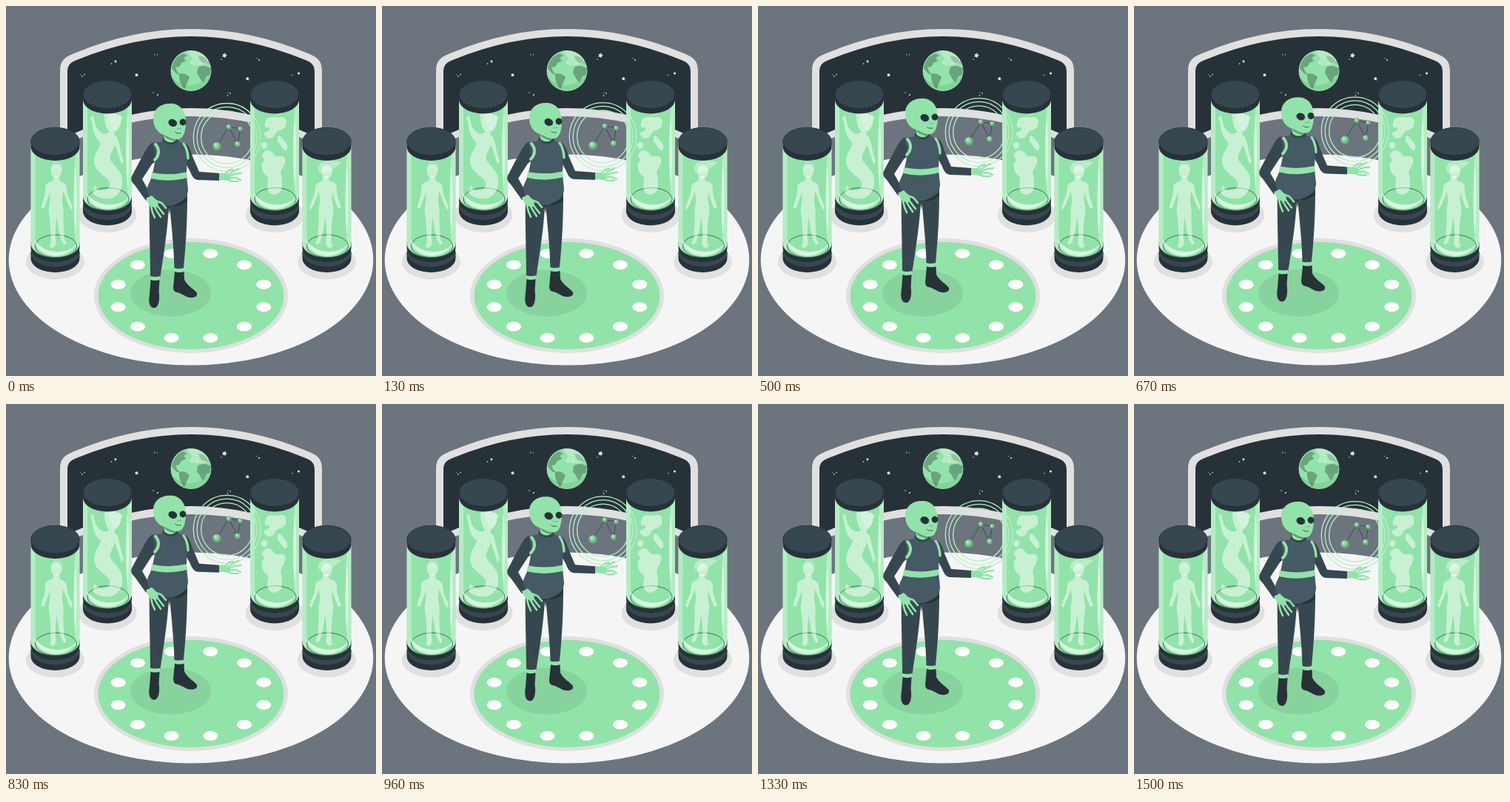
Animation of 500x500 px, one loop 1.54 s. Source, as an HTML page with a canvas:

```html
<!DOCTYPE html>
<html lang="en">
<head>
<meta charset="utf-8">
<title>Alien laboratory</title>
<style>
  html, body { margin: 0; width: 100%; height: 100%; overflow: hidden; background: #6c747e; }
  canvas { display: block; }
</style>
</head>
<body>
<canvas id="stage" width="500" height="500"></canvas>
<script>
const LOOP = 1540, LIFT = 8.6, LEAD = 45;
const GREEN = '#92e3a9', DARK = '#263238', SLATE = '#37474f', STEEL = '#455a64';
const PALE = '#e0e0e0', WHITE = '#fff', GLOW = 'rgba(255,255,255,.5)';

const stage = document.getElementById('stage');
const view = stage.getContext('2d');
const scene = document.createElement('canvas');
scene.width = scene.height = 500;
let ctx = scene.getContext('2d');

function fill(d, color) {
  ctx.fillStyle = color;
  ctx.fill(new Path2D(d));
}

function stroke(d, color, width) {
  ctx.strokeStyle = color;
  ctx.lineWidth = width;
  ctx.lineCap = ctx.lineJoin = 'round';
  ctx.stroke(new Path2D(d));
}

function oval(x, y, rx, ry, color, turn = 0) {
  ctx.fillStyle = color;
  ctx.beginPath();
  ctx.ellipse(x, y, rx, ry, turn, 0, Math.PI * 2);
  ctx.fill();
}

function ring(x, y, rx, ry, color, width) {
  ctx.strokeStyle = color;
  ctx.lineWidth = width;
  ctx.beginPath();
  ctx.ellipse(x, y, rx, ry, 0, 0, Math.PI * 2);
  ctx.stroke();
}

function star(x, y, r) {
  ctx.fillStyle = WHITE;
  ctx.beginPath();
  for (let i = 0; i < 10; i++) {
    const a = i * Math.PI / 5 - 1.3, d = i % 2 ? r * 0.48 : r;
    ctx.lineTo(x + d * Math.cos(a), y + d * Math.sin(a));
  }
  ctx.fill();
}

function drawWindow() {
  fill('M73 190V88C73 74 79 69 92 64Q250 -2 408 64C421 69 427 74 427 88V190Q250 108 73 190Z', PALE);
  fill('M83 176V90C83 79 87 76 98 72Q250 10 402 72C413 76 417 79 417 90V176Q250 100 83 176Z', DARK);
  const dots = [[148, 75, 1.4], [142.5, 78, .8], [201, 65.5, .7], [204.5, 66, .6], [103, 95, .8],
    [106, 92.5, .8], [101, 93, .5], [199, 117, .7], [205, 120, .9], [291, 72, .7], [339, 70.5, .6],
    [342, 73, .9], [300, 117, .6], [303, 118, .8], [299.5, 121, .8], [395.5, 91, 1.5], [387, 93.5, .7]];
  for (const [x, y, r] of dots) oval(x, y, r, r, WHITE);
  star(176.5, 93.3, 2.8);
  star(295.3, 66.8, 3.6);
  star(326.3, 98.3, 2.8);
}

function drawPlanet() {
  ctx.save();
  ctx.beginPath();
  ctx.arc(250, 87.5, 27.5, 0, Math.PI * 2);
  ctx.clip();
  oval(250, 87.5, 28, 28, GREEN);
  const land = '#69a47c';
  fill('M224 84C226 73 233 66 240 64L245 67L240 70L243 74L237 77L234 82L229 83L231 88L235 92L231 92L226 87Z', land);
  fill('M234 92C240 90 246 93 248 97C245 102 243 108 241 112C237 107 233 100 234 92Z', land);
  fill('M259 84C263 80 270 80 277 84L276 93L271 95L267 103C262 101 263 95 258 92Z', land);
  fill('M260 67L268 69L275 78L266 77L262 73Z', land);
  fill('M244 60Q262 57 273 72Q276 78 268 79Q253 82 247 77L252 71Z', 'rgba(255,255,255,.3)');
  fill('M225 97Q248 119 276 94L274 114H228Z', 'rgba(0,0,0,.08)');
  ctx.restore();
}

function drawPlatform() {
  oval(250, 391.5, 131, 77.5, PALE);
  oval(250, 391.5, 125.5, 72.5, GREEN);
  for (let i = 0; i < 12; i++) {
    const a = (i + 0.5) * Math.PI / 6;
    oval(250 + 101.8 * Math.cos(a), 391.5 + 59 * Math.sin(a), 10, 6.4, WHITE);
  }
  oval(222.5, 388, 54.5, 31.5, '#88d29d');
}

// Tank coordinates are relative to the centre of its lid.
function drawTank(x, y, specimen) {
  ctx.save();
  ctx.translate(x, y);
  oval(0, 163, 39.5, 23.5, PALE);
  fill('M-33 149V158A33 19 0 0 0 33 158V149Z', DARK);
  oval(0, 150.5, 33, 19, SLATE);
  fill('M-33 136V144A33 19 0 0 0 33 144V136Z', DARK);
  fill('M-33 0V138A33 19 0 0 0 33 138V0Z', GREEN);
  fill('M-33 0H-27V147Q-33 142 -33 138ZM33 0H27V147Q33 142 33 138Z', 'rgba(255,255,255,.32)');
  ring(1, 141.5, 28, 15.3, SLATE, .8);
  specimen();
  fill('M27 26Q31 80 27 128Q23 80 27 26Z', 'rgba(255,255,255,.6)');
  fill('M-28 133C-24 160 18 162 29 138C20 152 -14 155 -28 133Z', 'rgba(255,255,255,.65)');
  fill('M-33 0V7A33 19 0 0 0 33 7V0Z', DARK);
  oval(0, 0, 33, 19, SLATE);
  ring(0, 0, 32.7, 18.7, DARK, .7);
  ctx.restore();
}

const PERSON = 'M-2 47L-3 53C-8 55 -12 56 -13 60L-14 73L-18 84L-19 90L-15 91L-13 85L-9 74L-7 67'
  + 'L-7 79L-9 91L-7 108L-6 122L-6 138L-8 142L-3 144L1 140L0 123L2 101L5 121L8 133L12 140L15 138'
  + 'L12 130L11 110L11 91L9 79L11 67L14 76L18 86L21 92L24 90L21 82L17 73L15 60C13 56 8 55 6 53L5 47Z';

function man() {
  fill(PERSON, GLOW);
  oval(1.5, 40, 7.5, 9, GLOW);
  fill('M-6 37C-7 29 2 25 8 29C12 32 10 39 8 39C4 35 -2 37 -6 37Z', 'rgba(255,255,255,.2)');
}

function woman() {
  ctx.save();
  ctx.scale(-1, 1);
  fill(PERSON, GLOW);
  oval(0, 41, 7.5, 9, GLOW);
  fill('M-20 29C-13 25 3 25 9 30C13 34 12 42 7 43C0 43 -10 37 -14 33Z', 'rgba(255,255,255,.35)');
  ctx.restore();
}

function mermaid() {
  fill('M-4 26C3 24 17 26 20 31C17 37 18 47 11 49L9 54C14 57 16 66 18 76L22 90L19 95L16 84L10 67'
    + 'C8 76 2 82 4 88C8 97 19 102 20 115C21 132 12 140 0 141C-9 141 -17 138 -20 132L-17 123'
    + 'C-13 131 -4 132 2 126C8 116 -7 110 -13 103C-21 94 -18 82 -12 73L-9 65C-16 60 -20 50 -20 41'
    + 'L-23 31L-19 29L-17 39C-15 47 -9 53 -3 53L3 51C-2 46 -4 38 -4 26Z', GLOW);
  fill('M0 27C8 24 17 27 20 31C18 40 17 46 11 49C5 47 5 36 0 27Z', 'rgba(255,255,255,.2)');
}

function mutant() {
  fill('M-12 36C-10 28 2 32 7 31C14 29 17 35 15 42C13 49 4 47 1 53C-2 61 -11 61 -14 55'
    + 'C-16 48 -4 51 -7 45C-15 45 -14 41 -12 36Z', GLOW);
  fill('M4 57C8 53 10 60 14 64C19 68 18 78 13 75C9 72 8 67 4 64Z', GLOW);
  oval(-14, 69, 4, 4.5, GLOW);
  fill('M-14 78C-10 72 -3 77 0 83C5 85 12 81 14 87C16 95 9 100 8 106C10 114 11 121 9 129'
    + 'C5 138 -7 137 -9 129C-12 121 -6 115 -11 110C-18 105 -20 91 -13 89C-18 84 -18 80 -14 78Z', GLOW);
}

function drawScene() {
  ctx.fillStyle = '#6c747e';
  ctx.fillRect(0, 0, 500, 500);
  oval(250, 343, 246.3, 142.5, '#f5f5f5');
  drawWindow();
  drawPlanet();
  drawTank(137, 119.5, mermaid);
  drawTank(363, 119.5, mutant);
  drawTank(66.5, 183, man);
  drawTank(433.5, 183, woman);
  drawPlatform();
}

function node(x, y, r) {
  const shade = ctx.createRadialGradient(x - r * .35, y - r * .4, r * .1, x, y, r);
  shade.addColorStop(0, '#b4efc4');
  shade.addColorStop(.45, '#85ce9a');
  shade.addColorStop(1, '#5b9a70');
  oval(x, y, r, r, shade);
}

function drawHologram() {
  for (const r of [45.3, 40.5, 35]) ring(298.6, 177.5, r, r + .6, '#b9efc8', 1.3);
  stroke('M285 189.5L301 163.5L313 186.5L316.5 166L301 163.5', SLATE, .9);
  node(285, 189.5, 6);
  node(301, 163.3, 3.5);
  node(316.5, 166, 3.3);
  node(313, 186.7, 4.2);
}

function drawLegs() {
  fill('M220 253H245C245 285 244 313 240 355H227.5C227 325 223 293 221 266Z', SLATE);
  fill('M194 253H221L220 268C219 300 213 335 208.5 366H195C195 330 193 291 194 253Z', SLATE);
  fill('M194 257Q222 277 245 259L244 264Q233 273 222 270L221 282L219 270Q202 269 194 257Z', DARK);
  fill('M227 354Q233 356 240.5 354L240 359Q233 361 227.5 359Z', GREEN);
  fill('M195 365Q201 367 208.5 365L208 370Q201 372 195 370Z', GREEN);
  fill('M228 359Q234 361 240.5 359L241 370C245 378 253 382 257.5 387C260 392 255 394.5 249 394'
    + 'C241 393 238 388 231 387Q226 386 226 380Z', DARK);
  fill('M195.5 370Q201 372 207.5 370L206.5 386C208 395 207 408 200 408C193 408 192.5 398 194 389Z', DARK);
}

function drawBody() {
  fill('M239 184C246 186 249 193 252 203L261 224L288 226V236L259 235C253 234 251 229 248 222L238 204Z', SLATE);
  fill('M211 184L197 185C190 190 186 201 180 211L170 230C168 235 170 238 174 242L189 263L197 257'
    + 'L184 234L197 214L205 207Z', SLATE);
  fill('M198 186L211 183L213 178H230L233 183L241 186C247 198 244 214 244 229L246 248'
    + 'C246 260 235 267 223 270C207 270 193 263 191 249C190 243 195 238 197 230C201 214 204 202 198 186Z', STEEL);
  fill('M197 225Q220 230 244 224.5L245 232Q220 239 196 233Z', GREEN);
  stroke('M202 187C208 194 207 202 201 208', GREEN, 4);
  stroke('M240 186C244 191 246 200 246 206', GREEN, 3.3);
}

function drawHands() {
  fill('M189 260L197 256L204 263L206 268L203 273L197 271L192 266Z', GREEN);
  stroke('M195 267L198 279L201 286M199 269L205 279L209 285M203 268L209 276L213 281'
    + 'M202 263L210 266L216 273', GREEN, 2.6);
  fill('M288 226L297 226L304 230L302 236L288 235Z', GREEN);
  stroke('M294 229L302 222L307 221M299 229L307 224L314 220M300 231L310 227L318 226'
    + 'M300 233L310 232L317 235M297 234L305 237L314 237', GREEN, 2.3);
}

function drawHead() {
  fill('M214 169H230L229.5 182Q221 189 214 182Z', GREEN);
  fill('M215 174Q223 180 230 180L229.5 183Q220 181 215 177Z', '#5f9b73');
  stroke('M212.5 181Q221 190 231.5 182.5', SLATE, 3);
  fill('M221 132C235 131 243 142 243 157C243 170 239 180 233 180C227 181 221 176 213 174'
    + 'C203 171 199 161 199 152C199 140 208 132 221 132Z', GREEN);
  oval(225.3, 158, 6, 4.9, DARK, .4);
  oval(239, 157, 4.4, 4.5, DARK, -.4);
  stroke('M232 165.5L232.3 166M235.5 165.3L235.8 166', SLATE, .9);
  stroke('M228.5 170.5Q231 173 236 171.8', SLATE, .9);
}

function drawAlien() {
  drawHologram();
  drawLegs();
  drawBody();
  drawHands();
  drawHead();
}

drawScene();
ctx = view;

function frame(now) {
  const phase = (now % LOOP + LEAD) / LOOP * Math.PI * 2;
  ctx.drawImage(scene, 0, 0);
  ctx.save();
  ctx.translate(0, -LIFT * (1 - Math.cos(phase)) / 2);
  drawAlien();
  ctx.restore();
  requestAnimationFrame(frame);
}
requestAnimationFrame(frame);
</script>
</body>
</html>
```
